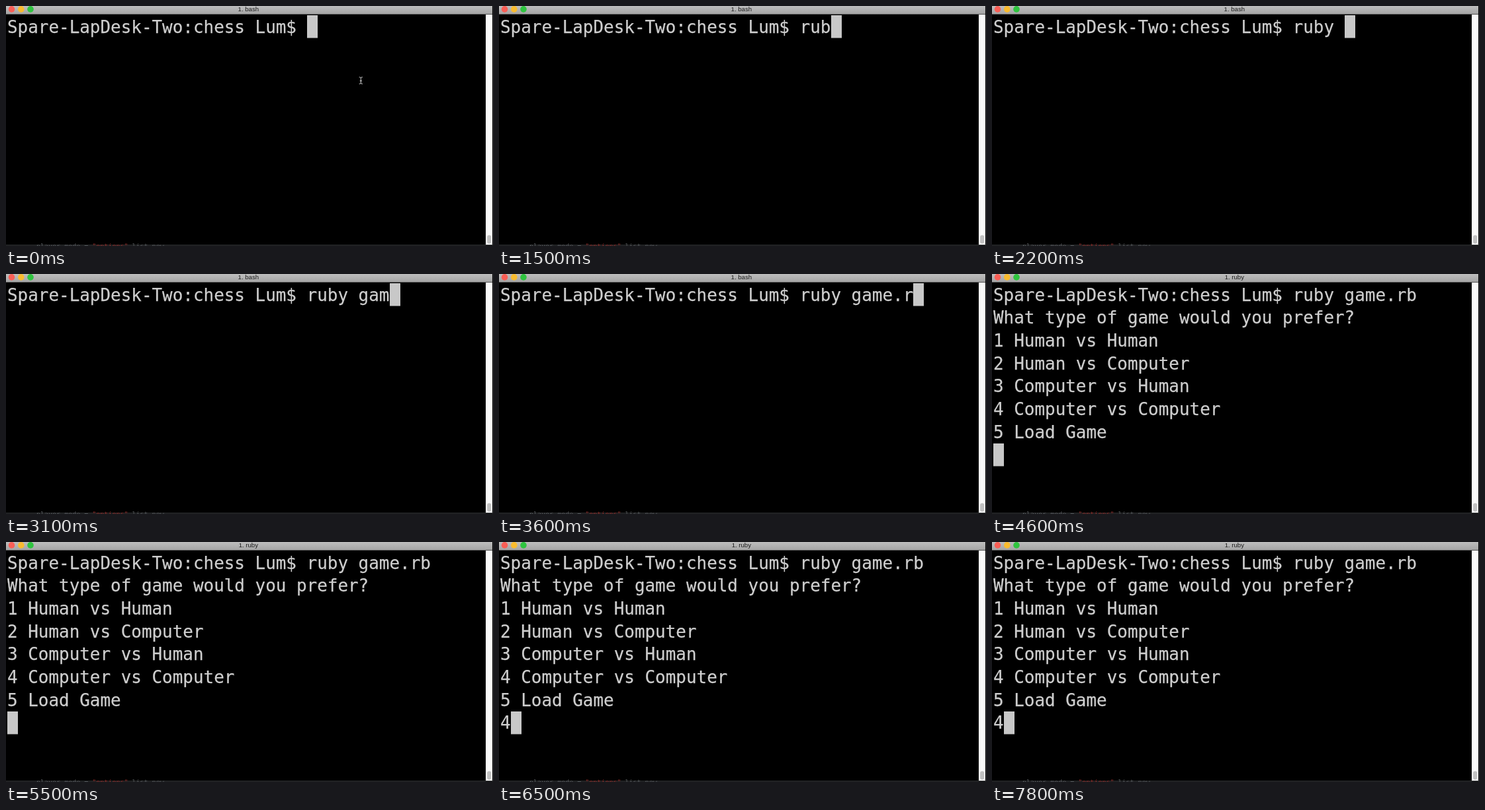
An HTML page that plays this animation: 736 px wide and 364 px high, repeating every 8 s.

```html
<!DOCTYPE html>
<html lang="en">
<head>
<meta charset="utf-8">
<title>Terminal</title>
<style>
  html, body { margin: 0; width: 100%; height: 100%; overflow: hidden; background: #000; }
  svg { display: block; width: 736px; height: 364px; }
  .term { font: 25.93px "DejaVu Sans Mono", monospace; fill: #cecece; stroke: #cecece; stroke-width: .25px; white-space: pre; }
  .title { font: 9.6px "Liberation Sans", Arial, sans-serif; fill: #1c1c1c; text-anchor: middle; }
  .behind { font: 10px "DejaVu Sans Mono", monospace; fill: #55585c; white-space: pre; }
</style>
</head>
<body>
<svg viewBox="0 0 736 364">
  <defs>
    <linearGradient id="bar" x1="0" y1="0" x2="0" y2="1">
      <stop offset="0" stop-color="#bebebe"/>
      <stop offset="1" stop-color="#a4a4a4"/>
    </linearGradient>
  </defs>
  <rect width="736" height="364" fill="#000"/>
  <rect y="362" width="736" height="1" fill="#2e3032"/>
  <rect y="363" width="736" height="1" fill="#17181a"/>
  <text class="behind" x="46" y="368">player_mode = <tspan fill="#8c2f2c">"options"</tspan> list.new</text>
  <rect width="735" height="12.5" fill="url(#bar)"/>
  <circle cx="8.5" cy="4.9" r="4.8" fill="#f95f56"/>
  <circle cx="22.8" cy="4.9" r="4.8" fill="#f9bb2f"/>
  <circle cx="37" cy="4.9" r="4.8" fill="#2fc43f"/>
  <text id="title" class="title" x="366.3" y="8.3"></text>
  <rect x="725" y="13" width="10" height="349" fill="#fafafa"/>
  <rect x="727.2" y="347.5" width="6" height="13" rx="3" fill="#c1c1c1"/>
  <g id="lines"></g>
  <rect id="cursor" width="16" height="34.5" fill="#c8c8c8"/>
  <path id="mouse" d="M533.7 108h1.8l.8 .8 .8-.8h1.8M536.3 108.8v8.6M533.7 118h1.8l.8-.8 .8 .8h1.8M534.8 113.5h3" fill="none" stroke="#d4d4d4"/>
</svg>
<script>
  const LOOP = 8000, LEFT = 2, TOP = 14, ADVANCE = 15.61, PITCH = 34.7;
  const PROMPT = "Spare-LapDesk-Two:chess Lum$ ";
  const COMMAND = "ruby game.rb";
  const KEYS = [1100, 1400, 1500, 1600, 2200, 2900, 3000, 3100, 3300, 3500, 3600, 3700];
  const ENTER = 4300, MENU_AT = 4600, CHOICE_AT = 5900;
  const MENU = [
    "What type of game would you prefer?",
    "1 Human vs Human",
    "2 Human vs Computer",
    "3 Computer vs Human",
    "4 Computer vs Computer",
    "5 Load Game"
  ];

  const el = id => document.getElementById(id);
  const title = el("title"), cursor = el("cursor"), mouse = el("mouse");
  const rows = Array.from({ length: MENU.length + 2 }, (_, i) => {
    const row = document.createElementNS("http://www.w3.org/2000/svg", "text");
    row.setAttribute("class", "term");
    row.setAttribute("x", LEFT);
    row.setAttribute("y", TOP + 26.5 + i * PITCH);
    return el("lines").appendChild(row);
  });

  function screen(t) {
    const typed = KEYS.filter(k => k <= t).length;
    const lines = [PROMPT + COMMAND.slice(0, typed)];
    if (t >= MENU_AT) lines.push(...MENU);
    if (t >= ENTER) lines.push(t >= CHOICE_AT ? "4" : "");
    return lines;
  }

  function draw(t) {
    const lines = screen(t), last = lines.length - 1;
    rows.forEach((row, i) => {
      const text = lines[i] || "";
      if (row.textContent !== text) row.textContent = text;
    });
    cursor.setAttribute("x", Math.round(LEFT + lines[last].length * ADVANCE));
    cursor.setAttribute("y", Math.round(TOP + last * PITCH));
    title.textContent = t < MENU_AT ? "1. bash" : "1. ruby";
    mouse.style.display = t < KEYS[0] ? "" : "none";
  }

  const start = performance.now();
  function tick() {
    draw((performance.now() - start) % LOOP);
    requestAnimationFrame(tick);
  }
  tick();
</script>
</body>
</html>
```
